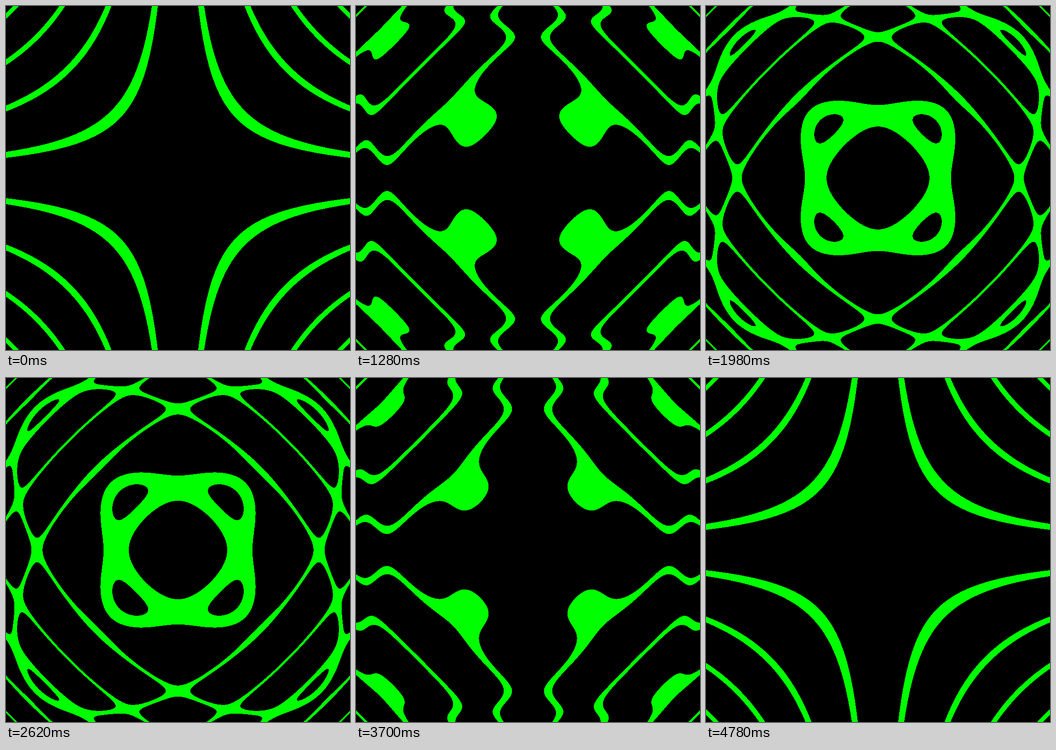
An HTML page with a canvas that plays this animation: 748x748 px, repeating every 4800 ms.

```html
<!DOCTYPE html>
<html lang="en">
<head>
<meta charset="utf-8">
<title>a·sin(x² + y²) = cos(xy)</title>
<style>
  html, body { margin: 0; width: 100%; height: 100%; overflow: hidden; background: #000; }
  canvas { display: block; }
</style>
</head>
<body>
<canvas id="stage" width="748" height="748"></canvas>
<script>
const SIZE = 748;
const UNIT = 109.5;      // pixels per unit of x and y
const TOLERANCE = 0.2;   // how far both sides may differ and still be green
const LOOP = 4800;
const STEP = 20;
const GREEN = 0xff00ff00;
const BLACK = 0xff000000;

const ctx = document.getElementById('stage').getContext('2d');
const image = ctx.createImageData(SIZE, SIZE);
const pixels = new Uint32Array(image.data.buffer);

// Both sides of the equation depend only on position, so compute them once.
const rings = new Float32Array(SIZE * SIZE);
const hyperbolas = new Float32Array(SIZE * SIZE);
const toUnits = p => (p + 0.5 - SIZE / 2) / UNIT;

for (let row = 0, i = 0; row < SIZE; row++) {
  const y = toUnits(row);
  for (let col = 0; col < SIZE; col++, i++) {
    const x = toUnits(col);
    rings[i] = Math.sin(x * x + y * y);
    hyperbolas[i] = Math.cos(x * y);
  }
}

function draw(time) {
  const amplitude = (1 - Math.cos(2 * Math.PI * time / LOOP)) / 2;
  for (let i = 0; i < pixels.length; i++) {
    const difference = Math.abs(amplitude * rings[i] - hyperbolas[i]);
    pixels[i] = difference < TOLERANCE ? GREEN : BLACK;
  }
  ctx.putImageData(image, 0, 0);
}

const start = performance.now();
let shown = -1;

function tick() {
  const elapsed = (performance.now() - start) % LOOP;
  const time = Math.floor(elapsed / STEP) * STEP;
  if (time !== shown) draw(shown = time);
  requestAnimationFrame(tick);
}

tick();
</script>
</body>
</html>
```
